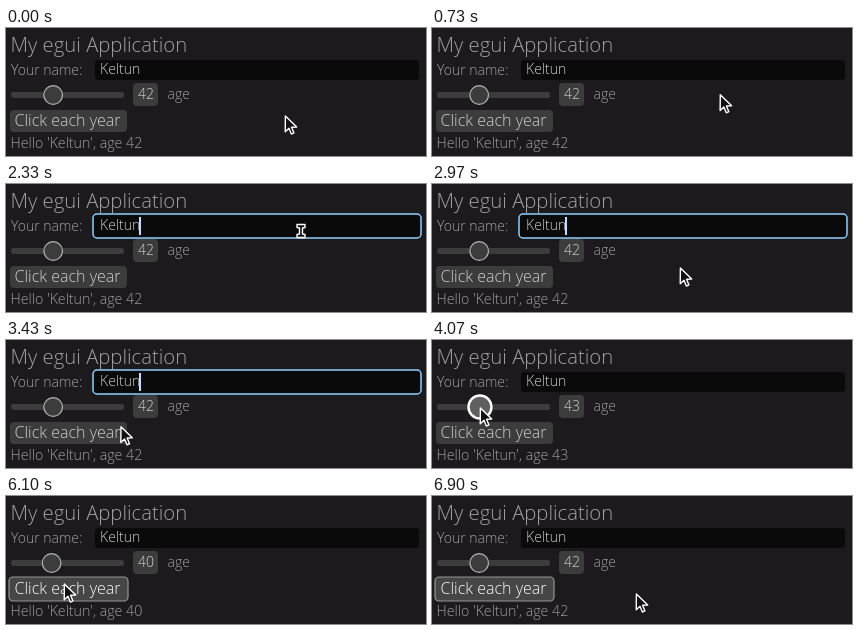
These frames come from a looping animation (420x128 px, 6930 ms). An HTML page with a canvas:

```html
<!DOCTYPE html>
<html lang="en">
<head>
<meta charset="utf-8">
<title>My egui Application</title>
<style>
  html, body { margin: 0; width: 100%; height: 100%; overflow: hidden; background: #1c1a1d; }
  canvas { display: block; }
</style>
</head>
<body>
<canvas id="stage" width="420" height="128"></canvas>
<script>
const ctx = document.getElementById('stage').getContext('2d');
const LOOP = 6930, NAME = 'Keltun', HOVER_LAG = 50;
const COLOR = {
  back: '#1c1a1d', label: '#a2a2a2', widget: '#3c3c3c', text: '#d2d2d2', edge: '#b4b4b4',
  bright: '#ffffff', hover: '#464646', border: '#969696',
  field: '#0a0a0a', focus: '#90d1ff', caret: '#c0deff'
};
const FOCUS_ON = 1070, DRAG_ON = 4030, DRAG_OFF = 5270, PRESS = 70;

const rect = (x, y, w, h) => ({ x, y, w, h });
const grow = (r, d) => rect(r.x - d, r.y - d, r.w + 2 * d, r.h + 2 * d);
const inside = (r, p) => p.x >= r.x && p.x <= r.x + r.w && p.y >= r.y && p.y <= r.y + r.h;
const clamp = (v, lo, hi) => Math.min(hi, Math.max(lo, v));
const lerp = (a, b, u) => a + (b - a) * u;

const FIELD = rect(89, 32, 324, 20);
const SLIDER = rect(5, 57, 113, 20);
const BUTTON = rect(4, 82, 117, 22);

// How many evenly spaced events have happened by time t.
const count = (t, first, gap, max) => clamp(Math.floor((t - first) / gap) + 1, 0, max);
const erased = t => count(t, 1130, 117, 5);
const typed = t => count(t, 1700, 140, 5);
const clicks = t => count(t, 5870, 153, 4);

const linear = u => u;
const accelerate = u => u * u;
const move = (from, to, x, y, ease = linear) => ({ from, to, x, y, ease });
const MOVES = [
  move(0, 70, 281, 84),
  move(400, FOCUS_ON, 295, 47),
  move(2600, 2970, 248, 83),
  move(2970, 3300, 133, 91),
  move(3300, 3900, 48, 67),
  move(4730, 4930, 44, 66),
  move(5500, 5650, 58, 87),
  move(6770, 6900, 204, 97, accelerate)
];

function pointerAt(t) {
  let p = { x: 279, y: 87 };
  for (const m of MOVES) {
    const u = m.ease(clamp((t - m.from) / (m.to - m.from), 0, 1));
    p = { x: lerp(p.x, m.x, u), y: lerp(p.y, m.y, u) };
  }
  return p;
}

function ageAt(t) {
  if (t < DRAG_ON) return 42;
  const dragged = Math.round(38 + (pointerAt(Math.min(t, DRAG_OFF)).x - 44) * 1.25);
  return dragged + clicks(t);
}

function text(str, x, y, size, color) {
  ctx.font = `350 ${size}px "Open Sans", "Noto Sans", sans-serif`;
  ctx.fillStyle = color;
  ctx.fillText(str, x, y);
  return x + ctx.measureText(str).width;
}

function paint(fill, stroke, width) {
  ctx.fillStyle = fill;
  ctx.fill();
  if (!stroke) return;
  ctx.strokeStyle = stroke;
  ctx.lineWidth = width;
  ctx.stroke();
}

function box(r, radius, fill, stroke, width = 1) {
  ctx.beginPath();
  ctx.roundRect(r.x, r.y, r.w, r.h, radius);
  paint(fill, stroke, width);
}

function drawField(name, focused, hovered) {
  if (focused) box(grow(FIELD, 2), 4, COLOR.field, COLOR.focus, 1.5);
  else if (hovered) box(grow(FIELD, 0.5), 3, COLOR.field, COLOR.border);
  else box(FIELD, 3, COLOR.field);
  const end = text(name, 94, 46, 14, COLOR.text);
  if (focused) {
    ctx.fillStyle = COLOR.caret;
    ctx.fillRect(Math.round(end) - 1, 33, 2, 18);
  }
}

function drawSlider(age, dragged, hovered) {
  box(rect(5, 64, 113, 6), 2.5, COLOR.widget);
  ctx.beginPath();
  ctx.arc(14 + age * 0.79, 67, dragged ? 11.5 : hovered ? 10.5 : 9.3, 0, Math.PI * 2);
  if (dragged) paint('#606060', COLOR.bright, 2.4);
  else if (hovered) paint(COLOR.hover, '#f0f0f0', 1.8);
  else paint(COLOR.widget, COLOR.edge, 1.2);
  box(rect(127, 55, 25, 23), 4, COLOR.widget);
  text(String(age), 132, 71, 14, COLOR.text);
  text('age', 161.5, 71, 14, COLOR.label);
}

function drawButton(pressed, hovered) {
  if (pressed) box(grow(BUTTON, 1), 4, '#606060', COLOR.bright, 1.2);
  else if (hovered) box(grow(BUTTON, 1), 4, COLOR.hover, COLOR.border, 1.2);
  else box(BUTTON, 4, COLOR.widget);
  text('Click each year', 8.5, 98, 16, pressed || hovered ? COLOR.bright : COLOR.text);
}

// Fills a shape given by its right half, from top to bottom.
function mirrored(half) {
  const left = half.map(([x, y]) => [-x, y]).reverse();
  ctx.beginPath();
  [...half, ...left].forEach(p => ctx.lineTo(...p));
  ctx.closePath();
  paint('#111', '#fff', 1.4);
}

function drawPointer({ x, y }, beam) {
  ctx.save();
  ctx.translate(x, y);
  ctx.lineJoin = 'round';
  if (beam) {
    const lower = [[1.5, 3], [4, 3.5], [4, 6.5]];
    const upper = lower.map(([px, py]) => [px, -py]).reverse();
    mirrored([...upper, ...lower]);
  } else {
    ctx.rotate(-Math.PI / 8);
    mirrored([[0, 1], [6.2, 15.6], [1.4, 13.8], [1.4, 20]]);
  }
  ctx.restore();
}

function draw(t) {
  const seen = pointerAt(t - HOVER_LAG);
  const dragged = t >= DRAG_ON && t < DRAG_OFF;
  const pressed = clicks(t + PRESS) > clicks(t);
  const name = NAME.slice(0, NAME.length - erased(t) + typed(t));
  const age = ageAt(t);

  ctx.fillStyle = COLOR.back;
  ctx.fillRect(0, 0, 420, 128);
  text('My egui Application', 4.5, 23.5, 20.3, COLOR.label);
  text('Your name:', 5, 46.5, 14, COLOR.label);
  drawField(name, t >= FOCUS_ON && t < DRAG_ON, inside(FIELD, seen));
  drawSlider(age, dragged, inside(SLIDER, seen));
  drawButton(pressed, !dragged && inside(BUTTON, seen));
  text(`Hello '${name}', age ${age}`, 4.5, 120, 14.2, COLOR.label);
  drawPointer(pointerAt(t), inside(FIELD, seen));
}

// Thirty steps a second, rounded to hundredths.
const start = performance.now();
function tick(now) {
  const t = Math.max(0, now - start) % LOOP;
  const step = Math.floor((t + 3.4) * 0.03);
  draw(Math.round(step * 10 / 3) * 10);
  requestAnimationFrame(tick);
}
draw(0);
requestAnimationFrame(tick);
</script>
</body>
</html>
```
